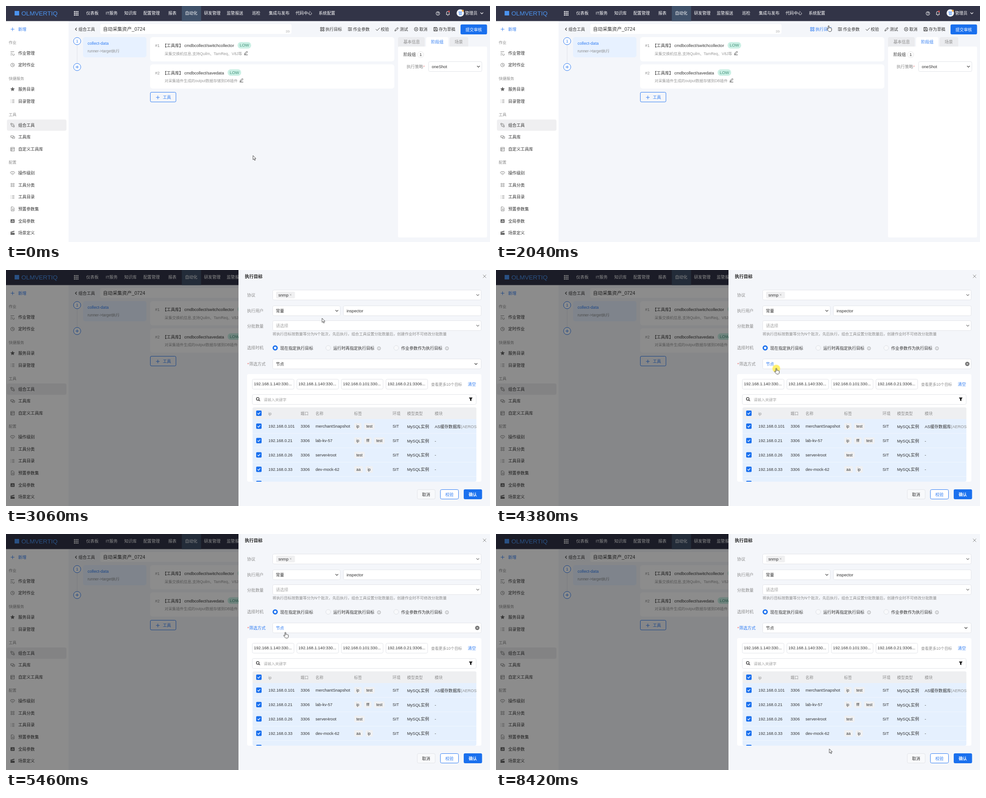
These frames come from a looping animation (1068 px wide and 524 px high, 8.48 s). An HTML page:

```html
<!DOCTYPE html>
<html>
<head>
<meta charset="utf-8">
<title>Tool editor</title>
<style>
html, body { margin: 0; width: 100%; height: 100%; overflow: hidden; background: #f4f6fa; }
svg { display: block; width: 100vw; height: 100vh; font-family: "Liberation Sans", "Noto Sans CJK SC", "Noto Sans CJK", sans-serif; }
#pointer { animation: pointer 8480ms step-end infinite; }
</style>
</head>
<body>
<svg id="stage" viewBox="0 0 1068 524"></svg>
<script>
const LOOP = 8480;
const BLUE = '#1a70ee', LINK = '#2f7cf2', INK = '#333', GREY = '#8c8c8c', PALE = '#a5a5a5', EDGE = '#e2e4e9', PAGE = '#f4f6fa';
const rules = [];

// Drawing helpers; y is the vertical middle for text and icons
const text = (x, y, s, fill = INK, size = 9.1, extra = '') =>
  `<text x="${x}" y="${y + size * 0.37}" fill="${fill}" font-size="${size}" ${extra}>${s}</text>`;
const box = (x1, y1, x2, y2, fill, r = 0, stroke = 'none') => {
  const o = stroke === 'none' ? 0 : 0.5;
  return `<rect x="${x1 + o}" y="${y1 + o}" width="${x2 - x1 - 2 * o}" height="${y2 - y1 - 2 * o}" rx="${r}" fill="${fill}" stroke="${stroke}"/>`;
};
const dot = (x, y, r, fill, stroke = 'none', width = 1) =>
  `<circle cx="${x}" cy="${y}" r="${r}" fill="${fill}" stroke="${stroke}" stroke-width="${width}"/>`;
const icon = (x, y, d, color = '#555', width = 1, fill = 'none') =>
  `<path transform="translate(${x} ${y})" d="${d}" fill="${fill}" stroke="${color}" stroke-width="${width}"/>`;

// Timeline helpers
const track = (name, stops) =>
  rules.push(`@keyframes ${name}{${stops.map(([ms, css]) => `${(ms / LOOP * 100).toFixed(4)}%{${css}}`).join('')}}`);
const during = (markup, ...spans) => {
  const name = 'show' + rules.length;
  const stops = spans[0][0] ? [[0, 'opacity:0']] : [];
  for (const [from, to] of spans) {
    stops.push([from, 'opacity:1']);
    stops.push([to, `opacity:${to === LOOP ? 1 : 0}`]);
  }
  track(name, stops);
  return `<g style="animation:${name} ${LOOP}ms step-end infinite">${markup}</g>`;
};

const ring = r => `M${-r} 0a${r} ${r} 0 1 0 ${2 * r} 0a${r} ${r} 0 1 0 ${-2 * r} 0z`;
const shape = {
  down: 'M-3-1.5 0 1.5 3-1.5',
  left: 'M1.5-3-1.5 0 1.5 3',
  plus: 'M-4 0h8M0-4v8',
  cross: 'M-3.5-3.5l7 7m0-7l-7 7',
  check: 'M-4 0l3 3 5.5-6',
  list: 'M-4-3h1m2 0h5M-4 0h1m2 0h5M-4 3h1m2 0h5',
  jobs: 'M-4.5-3.5h8M-4.5 0h4M-4.5 3.5h3M1 1a2 2 0 1 0 2 0',
  clock: ring(4) + 'M0-2.5V.5H2.5',
  star: 'M0-5l1.5 3.2 3.5.4-2.6 2.4.7 3.6L0 2.8-3.1 4.6l.7-3.6L-5-1.4l3.5-.4z',
  flow: 'M-4-4h3v3h-3zM1 1h3v3h-3zM0-2.5h2.5V0M-2.5 0v2.5H0',
  copy: 'M-4-3h6v3.5h-6zM-1 .5V3h5.5V-1H2',
  table: 'M-4-4h8v8h-8zM-4-1.5h8M-1 1h3M-2.5-1.5v5.5',
  gem: 'M-3-3.5h6L5-1 0 4-5-1zM-2-1L0 1 2-1',
  four: [[-2.3, -2.3], [2.3, -2.3], [-2.3, 2.3], [2.3, 2.3]].map(([x, y]) => `M${x - 1.5} ${y}a1.5 1.5 0 1 0 3 0a1.5 1.5 0 1 0-3 0`).join(''),
  squares: 'M-4-4h3v3h-3zM1-4h3v3H1zM-4 1h3v3h-3zM1 1h3v3H1z',
  page: 'M-3-4.5h4l2.5 2.5v6.5H-3zM-1 0h3M-1 2h3',
  sliders: 'M-4.5-3h9M-4.5 0h9M-4.5 3h9M-2-4v2M2-1v2M-1 2v2',
  pencil: 'M-3 2.5l.5-2.2L2-4 3.6-2.4-.8 2zM-4 4h8',
  pen: 'M-4 4l1-3 4-4 2 2-4 4zM2-4l2 2',
  circled: ring(4) + 'M-1.6-1.6l3.2 3.2m0-3.2l-3.2 3.2',
  save: 'M-4-4h6.5L4-2.5V4h-8zM-2-4v2.5h3.5V-4M-2 4V1h4v3',
  funnel: 'M-4-4h8L1.5 0v4L-1.5 3V0z',
  info: ring(3.6) + 'M0-.3v2.3M0-2v1',
};

function topBar() {
  const items = [[177, '仪表板'], [220, 'IT服务'], [261, '知识库'], [303, '配置管理'], [358, '报表'], [395, '自动化'], [437, '研发管理'],
    [487, '监管报送'], [543, '巡检'], [580, '集成与发布'], [639, '代码中心'], [690, '系统配置'], [1013, '管理员']];
  let grid = '';
  for (let i = 0; i < 9; i++) grid += box(150 + i % 3 * 3.7, 11.5 + (i / 3 | 0) * 3.7, 152.4 + i % 3 * 3.7, 13.9 + (i / 3 | 0) * 3.7, '#fff');
  return box(0, 0, 1068, 33.5, '#323447') + box(388, 0, 430.5, 33.5, '#405169') +
    box(19, 11, 29, 21, '#4b93ee') + text(34, 16, 'OLMVERTIQ', '#4b93ee', 13.6) + grid +
    items.map(([x, s]) => text(x, 16, s, '#fff')).join('') +
    icon(953, 16.5, ring(4), '#fff') + text(950.9, 16.5, '?', '#fff', 7, 'font-weight="bold"') +
    icon(975, 16, 'M-4 3h8M-3 3v-4a3 3 0 0 1 6 0v4M-1 5h2', '#fff') + dot(977.5, 12, 1.8, '#f04848') +
    dot(1002.5, 15.5, 8.2, '#eef3fb') + text(998.2, 16, '管', LINK, 8.5) + dot(1008, 10.5, 2.2, '#f4a742') +
    icon(1050, 16, shape.down, '#fff', 1.1);
}

function sideBar() {
  const heads = [[81, '作业'], [161, '快捷服务'], [241, '工具'], [347, '配置']];
  const items = [[105, 'jobs', '作业管理'], [131, 'clock', '定时作业'], [184.5, 'star', '服务目录'], [211.5, 'list', '目录管理'],
    [264.5, 'flow', '组合工具'], [291, 'copy', '工具库'], [318, 'table', '自定义工具库'], [371, 'gem', '操作级别'], [397.5, 'four', '工具分类'],
    [424, 'list', '工具目录'], [450.5, 'page', '预置参数集'], [477.5, 'chart', '全局参数'], [504, 'scene', '场景定义']];
  const solid = {
    chart: (x, y) => box(x - 4.5, y - 4, x + 4.5, y + 4, '#666', 1) + icon(x, y, 'M-2 2V0M0 2v-4M2 2V-1', '#fff'),
    scene: (x, y) => box(x - 4.5, y - .5, x + 4.5, y + 4, '#666', .5) + icon(x, y, 'M-4.5-1.5L4-4', '#666', 2),
    star: (x, y) => icon(x, y, shape.star, 'none', 0, '#666'),
  };
  return box(0, 33, 138, 524, '#fff') + box(2, 252, 133.5, 277, '#efeff1', 4) +
    icon(14.5, 51.5, shape.plus, LINK, .9) + text(27, 52, '新增', LINK) +
    heads.map(([y, s]) => text(6, y, s, GREY, 8.5)).join('') +
    items.map(([y, k, s]) => (solid[k] ? solid[k](14.5, y) : icon(14.5, y, shape[k], '#777', .9)) + text(27, y, s)).join('');
}

function toolCard(y, no, name, badge, note, penX) {
  return box(318, y, 857, y + 54, '#fff', 6) + text(329, y + 19, no, GREY) + text(345.5, y + 19, '【工具库】 ' + name) +
    box(badge, y + 11, badge + 30, y + 25.5, '#cbf0e5', 7.2) + text(badge + 4.7, y + 18, 'LOW', '#43907a') +
    text(350, y + 36.5, note, '#999', 8.42) + icon(penX, y + 35.5, shape.pencil, INK, .9);
}

// Input or select box; chevronGap is the chevron's distance from the right edge, 0 for none
function field(x, y, right, label, color, chevronGap = 8, chevronColor = '#444') {
  return box(x, y, right, y + 23, '#fff', 3, EDGE) + text(x + 7.5, y + 11.5, label, color) +
    (chevronGap ? icon(right - chevronGap, y + 11.5, shape.down, chevronColor, 1.1) : '');
}

function workspace() {
  const tools = [[759, 'sliders', '作业参数'], [820, 'check', '校验'], [862, 'pen', '测试'], [905, 'circled', '取消'], [948, 'save', '存为草稿']];
  const target = c => icon(698, 51.5, shape.squares, c) + text(705, 51.5, '执行目标', c);
  return box(208, 40, 630, 62, '#fff', 4) + icon(154.5, 51.5, shape.left, INK, 1.1) + text(160, 51.5, '组合工具') +
    text(214, 51, '自动采集资产_0724', INK, 10.6) + text(617, 56, '39', '#b0b0b0', 8) +
    during(target(INK), [0, 1200]) + during(target(LINK), [1200, LOOP]) +
    tools.map(([x, k, s]) => icon(x, 51.5, shape[k], INK) + text(x + 7, 51.5, s)).join('') +
    box(1003, 41, 1061.5, 63, BLUE, 3) + text(1014, 53, '提交审核', '#fff') +
    icon(157, 87, 'M0 0v39', '#dfe2e8') + dot(157, 78, 8, '#fff', LINK) + text(154.5, 78, '1', LINK) +
    dot(157, 135.5, 8, '#fff', LINK) + icon(157, 135.5, 'M-3.5 0h7M0-3.5v7', LINK) +
    box(170, 69, 310, 114, '#e7f1ff', 5) + text(180, 82.5, 'collect-data', LINK) + text(180, 100, 'runner->target执行', GREY, 8.42) +
    toolCard(69, '#1', 'cmdbcollect/switchcollector', 511, '采集交换机信息,支持Quilm、TamReq、V8J等', 529.5) +
    toolCard(129.5, '#2', 'cmdbcollect/savedata', 489, '对采集插件生成的output数据存储到DB插件', 519.5) +
    box(318, 191, 375.5, 213.5, PAGE, 2.5, LINK) + icon(335, 203, shape.plus, LINK) + text(346, 203, '工具', LINK) +
    box(865, 69, 924, 92, '#ebecef', 4) + box(979, 69, 1020, 92, '#ebecef', 4) + box(927, 69, 976, 94, '#fff', 4) +
    box(865, 90, 1061.5, 514, '#fff', 3) + text(877, 79.5, '基本信息', GREY) + text(938, 79.5, '阶段组', LINK) + text(990, 79.5, '场景', GREY) +
    text(877, 108, '阶段组') + dot(915, 108, 6.8, '#fff', '#e6e6e6') + text(912.5, 108, '1') +
    text(884, 134.5, '执行策略<tspan fill="#e88">*</tspan>', GREY) + field(932, 123, 1050.5, 'oneShot', INK);
}

// Form whose right edge and lower rows depend on what has loaded
function form(right, loaded, bottom) {
  const dy = loaded ? 2 : 0, cut = right - 1053;
  const chips = ['1.140:330', '1.140:330', '0.101:330', '0.21:3306'];
  const radio = (x, on, s, tip) => dot(x, 173, on ? 4.2 : 5.3, on ? '#fff' : '#f8f9fb', on ? BLUE : '#dcdfe4', on ? 3 : 1) +
    text(x + 11, 173.5, s) + (tip ? icon(tip, 174, shape.info, '#888', .8) : '');
  return field(588, 44, right, loaded ? '' : '请选择', PALE, 8, '#777') +
    (loaded ? box(596, 48, 637.5, 63, '#f0f0f1', 2) + text(601, 56, 'snmp') + icon(628, 55, 'M-2-2l4 4m0-4l-4 4', '#aaa', .8) : '') +
    field(588, 79, 739 + cut / 4, '常量', INK) + field(745 + cut / 4, 79, right, 'inspector', INK, 0) +
    field(588, 112, right, '请选择', PALE, 8, '#777') +
    text(588, 142, '将执行目标按数量等分为N个批次，先后执行，组合工具设置分批数量后，创建作业时不可修改分批数量', GREY, 8.42) +
    (loaded ? radio(594, true, '现在指定执行目标') + radio(711, false, '运行时再指定执行目标', 823) + radio(861, false, '作业参数作为执行目标', 973) : '') +
    field(588, 195 + dy, right, '节点', INK, 12, INK) +
    box(532, 229 + dy, right, bottom, '#fff', 4) +
    chips.map((s, i) => {
      const x = 543 + i * (99.3 + cut / 4);
      return box(x, 240 + dy, x + 94 + cut / 4, 263 + dy, '#fff', 3, EDGE) + text(x + 4, 251 + dy, `192.168.${s}...`);
    }).join('') +
    text(942 + cut, 251.5 + dy, '查看更多10个目标', GREY, 8.42) + text(1023 + cut, 251.5 + dy, '清空', LINK) +
    box(543, 274 + dy, right - 11, 297 + dy, '#fff', 3, EDGE) +
    icon(556.5, 285 + dy, 'M1.5 1.5L4 4M-4-.8a3 3 0 1 0 6 0a3 3 0 1 0-6 0', INK, 1.3) + text(568.5, 285.5 + dy, '请输入关键字', PALE, 8.42) +
    icon(1029.5 + cut, 285 + dy, shape.funnel, 'none', 0, '#222');
}

function table() {
  const heads = [[579, 'ip'], [650, '端口'], [683, '名称'], [768, '标签'], [853, '环境'], [885, '模型类型'], [946, '模块']];
  const rows = [['101', 'merchantSnapshot', [[773, 'ip'], [795, 'test']]], ['21', 'lab-kv-57', [[773, 'ip'], [795, 'fff'], [817, 'test']]],
    ['26', 'server4root', [[773, 'test']]], ['33', 'dev-mock-62', [[773, 'aa'], [798, 'ip']]]];
  const tagWidth = { ip: 7, test: 14, fff: 7, aa: 10 };
  const tick = y => box(552, y - 6, 564, y + 6, BLUE, 2) + icon(558, y, 'M-3 0l2.2 2.2L3-2', '#fff', 1.3);
  let out = box(544, 305, 1038, 480, '#e5f0fe') + box(544, 305, 1038, 331, '#eeeff1') + tick(318) +
    heads.map(([x, s]) => text(x, 318.5, s, GREY, 8.7)).join('');
  rows.forEach(([ip, name, tags], i) => {
    const y = 346.8 + i * 31.9;
    out += tick(y) + icon(544, y + 16, 'M0 0h494', '#f1f6fd') + text(579, y, '192.168.0.' + ip) + text(650, y, '3306') + text(683, y, name) +
      tags.map(([x, s]) => box(x - 4.5, y - 7, x + tagWidth[s] + 4.5, y + 7.5, '#eff0f2', 2) + text(x, y + .5, s, INK, 8.42)).join('') +
      text(853, y, 'SIT') + text(885, y + .5, 'MySQL实例') +
      text(946, y + .5, i ? '-' : `AS缓存数据库<tspan fill="${GREY}">(AEROS</tspan>`);
  });
  return `<clipPath id="tableClip">${box(544, 305, 1038, 470, '#000', 4)}</clipPath><g clip-path="url(#tableClip)">${out}${tick(474)}</g>`;
}

function drawer() {
  const labels = [[56, '协议'], [90.5, '执行用户'], [125, '分批数量'], [173, '选择时机']];
  const filterLabel = (y, c) => text(532.5, y, '*', '#e66') + text(536.5, y, '筛选方式', c);
  const hover = box(590, 199, 1047, 218, '#fff') + text(595.5, 208.5, '节点', LINK) +
    dot(1040, 208.5, 4.8, '#757575') + icon(1040, 208.5, 'M-1.7-1.7l3.4 3.4m0-3.4l-3.4 3.4', '#fff');
  const menu = box(588, 197, 1049, 220, 'none', 3, LINK) + box(588, 223, 1049, 303, '#fff', 3, EDGE) +
    ['过滤器', '节点', '输入文本'].map((s, i) => text(596, 239 + i * 24, s, i === 1 ? LINK : INK)).join('');
  const cover = box(0, 0, 1068, 524, 'rgba(0,0,0,.45)') + box(513, 0, 1068, 524, PAGE) +
    text(527, 14, '执行目标', '#222', 9.75, 'font-weight="bold"') + icon(1056, 14, shape.cross, '#888') +
    labels.map(([y, s]) => text(532, y, s, GREY)).join('') +
    during(filterLabel(206.5, GREY), [2270, 2430]) + during(filterLabel(208.5, GREY), [2430, 4450]) + during(filterLabel(208.5, LINK), [4450, LOOP]) +
    during(form(1053, false, 314), [2270, 2430]) + during(form(1053, true, 316), [2430, 2900]) +
    during(form(1049, true, 470) + table(), [2900, LOOP]) +
    during(hover, [3890, 6100]) + during(menu, [4520, 5080]) +
    box(907, 487, 947.5, 509, '#f8f9fb', 3, EDGE) + text(918, 498.5, '取消') +
    box(958, 487, 999, 509, '#fff', 3, LINK) + text(969.5, 498.5, '校验', LINK) +
    box(1010, 487, 1050.5, 509, BLUE, 3) + text(1021, 498.5, '确认', '#fff', 9.1, 'font-weight="bold"');
  return during(cover, [2270, LOOP]);
}

function pointer() {
  const arrow = icon(0, 0, 'M0 0v9.3l2.1-1.9 1.5 3.4 1.6-.7-1.5-3.3h2.9z', '#222', .8, '#fff');
  const hand = icon(0, 0, 'M-1 .8c0-1.5 2-1.5 2 0v4l.7-.1c.4-.8 1.7-.6 1.8.2.5-.6 1.6-.3 1.7.5.6-.4 1.4 0 1.4.8V9c0 2.4-1.3 3.8-3.6 3.8C.5 12.8-.7 11.5-3.7 7.4c-.6-1.2.7-1.8 1.5-.9L-1 7.6z', '#222', .9, '#fff');
  const beam = icon(0, 0, 'M-2.2-5h1.6L0-4.4.6-5h1.6M0-4.4v8.8M-2.2 5h1.6L0 4.4.6 5h1.6', '#333', .9);
  const click = dot(0, .3, 8.6, 'rgba(255,236,60,.75)');
  const at = (x, y, jumps) => `transform:translate(${x}px,${y}px);` + (jumps ? `animation-timing-function:steps(${jumps - 1},jump-both)` : '');
  track('pointer', [
    [0, at(545, 332)], [560, at(545, 332, 10)], [1250, at(735, 45)], [1400, at(734, 44)],
    [2900, at(734, 44, 9)], [3510, at(624, 233)], [3810, at(624, 233, 3)], [3980, at(618.5, 218.5)],
    [5390, at(617.5, 218.5)], [5460, at(616.5, 218.5)], [6020, at(616.5, 218.5, 7)], [6480, at(655.5, 320)],
    [7110, at(655.5, 320, 4)], [7330, at(580.5, 315)], [7410, at(580.5, 315, 8)], [7940, at(571.5, 415)],
    [8020, at(571.5, 415, 6)], [8420, at(735.5, 477)], [LOOP, at(735.5, 477)],
  ]);
  return `<g id="pointer">${during(click, [1870, 2040], [4380, 4600], [4910, 5080])}` +
    during(arrow, [0, 1200], [2940, 3890], [6100, 6480], [7480, LOOP]) +
    during(hand, [1200, 2940], [3890, 6100]) + during(beam, [6480, 7480]) + '</g>';
}

const scene = box(0, 0, 1068, 524, PAGE) + sideBar() + topBar() + workspace() + drawer() + pointer();
const sheet = document.createElement('style');
sheet.textContent = rules.join('\n');
document.head.append(sheet);
document.getElementById('stage').innerHTML = scene;
</script>
</body>
</html>
```
